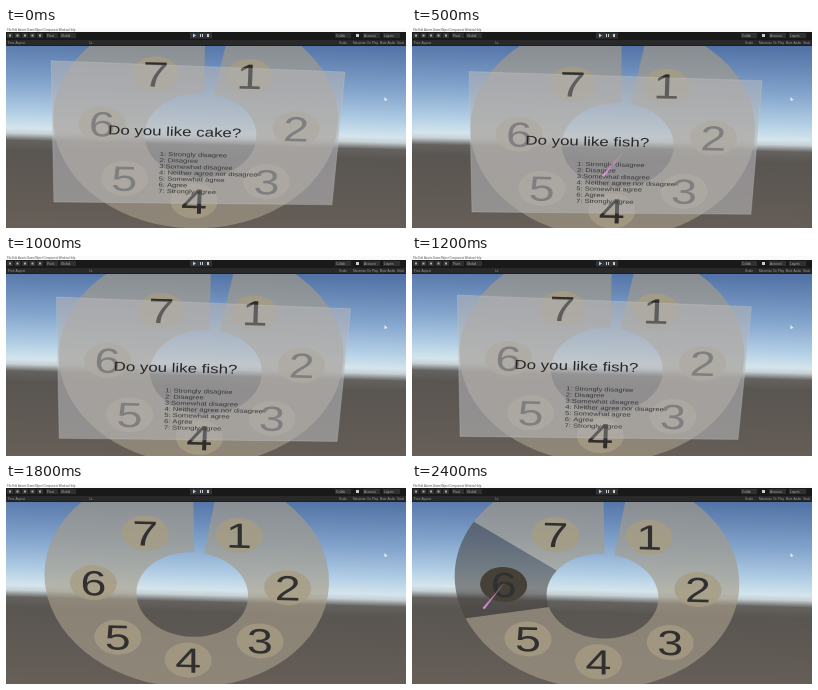
Animation, 400 px wide and 200 px high, one loop 2.5 s. Source, as an HTML page with a canvas:

```html
<!DOCTYPE html>
<html lang="en">
<head>
<meta charset="utf-8">
<style>
html, body { margin: 0; width: 100%; height: 100%; overflow: hidden; background: #222; }
canvas { display: block; width: 400px; height: 200px; }
</style>
</head>
<body>
<canvas id="stage" width="400" height="200"></canvas>
<script>
const c = document.getElementById('stage').getContext('2d');
const LOOP = 2500, STEP = 100, WIDE = 1.33, TAU = Math.PI * 2, SLICE = TAU / 7;
const INNER = .585, OUTER = 1.47;
const FONT = '"Liberation Sans", Arial, sans-serif';

// time, view offset x, y
const path = [[0, 7.5, -3], [300, 23, 8], [700, 14.5, 5.5], [1000, 13, 5.5],
  [1500, -1.5, 0], [2100, 0, 0], [2400, 3.5, 1.7]];
const answers = ['1: Strongly disagree', '2: Disagree', '3:Somewhat disagree',
  '4: Neither agree nor disagree', '5: Somewhat agree', '6: Agree', '7: Strongly agree'];
const PINK = '230,140,222', WHITE = '245,240,238';
const beams = [
  { from: 200, to: 900, x: -14, y: 32, rgb: PINK },
  { from: 1300, to: 1800, x: -37, y: 35, rgb: WHITE },
  { from: 1900, to: 2300, x: 26, y: 48, rgb: WHITE },
  { from: 2300, to: LOOP, x: -119, y: 16, rgb: PINK }
];

function viewAt(t) {
  const i = path.findIndex(p => p[0] > t);
  if (i < 0) return path[path.length - 1];
  const a = path[i - 1], b = path[i], u = (t - a[0]) / (b[0] - a[0]);
  const k = u * u * (3 - 2 * u);
  return a.map((v, j) => v + (b[j] - v) * k);
}

function rect(x, y, w, h, fill) {
  c.fillStyle = fill;
  c.fillRect(x, y, w, h);
}

function polygon(points, fill) {
  c.beginPath();
  for (const p of points) c.lineTo(...p);
  c.closePath();
  c.fillStyle = fill;
  c.fill();
}

function text(s, x, y, size, fill, wide = 1, align = 'left') {
  c.save();
  c.translate(x, y);
  c.scale(wide, 1);
  c.font = size + 'px ' + FONT;
  c.textAlign = align;
  c.fillStyle = fill;
  c.fillText(s, 0, 0);
  c.restore();
}

function sky(horizon, tilt) {
  const g = c.createLinearGradient(0, -100, 0, 90);
  const stops = [[-100, '#5273a6'], [-55, '#83a4cc'], [-25, '#b2cee5'], [-9, '#d4e5ec'],
    [-4, '#c6d0d5'], [3, '#64625f'], [14, '#595551'], [90, '#675f58']];
  for (const [y, col] of stops) g.addColorStop((y + 100) / 190, col);
  c.save();
  c.transform(1, tilt, 0, 1, 200, horizon);
  rect(-210, -130, 420, 240, g);
  c.restore();
}

// perspective point on the wheel, angle clockwise from the top
function project(angle, rx, ry = rx) {
  const y = -Math.cos(angle) * ry, w = 1 + .12 * y;
  const shift = -5.5 * (ry - INNER) / (OUTER - INNER);
  return [95.3 * Math.sin(angle) * rx / w + shift, 3.5 + 72 * y / w];
}

// the gap lies between the last slice and the first
function edge(i) {
  return i === 0 ? .2 : i === 7 ? TAU + .035 : i * SLICE;
}

function segment(first, last, fill) {
  const from = edge(first), span = edge(last) - from, n = 60, points = [];
  for (let i = 0; i <= n; i++) points.push(project(from + span * i / n, OUTER));
  for (let i = n; i >= 0; i--) points.push(project(from + span * i / n, INNER));
  polygon(points, fill);
}

function labelAt(i) {
  const [x, y] = project((i + .5) * SLICE, 1.02, .92);
  return [x - .03 * y, y + 3];
}

function digit(i, fill) {
  const [x, y] = labelAt(i);
  text(i + 1, x, y + 12.5, 35, fill, WIDE, 'center');
}

function wheel(t, active) {
  const body = 'rgba(165,155,137,.65)';
  if (active) {
    segment(0, active - 1, body);
    segment(active - 1, active, 'rgba(72,68,64,.58)');
    segment(active, 7, body);
  } else segment(0, 7, body);

  for (let i = 0; i < 7; i++) {
    c.beginPath();
    c.ellipse(...labelAt(i), 23.5, 17.5, 0, 0, TAU);
    c.fillStyle = i + 1 === active ? '#454139' : 'rgba(167,157,130,.8)';
    c.fill();
    digit(i, '#303030');
  }

  if (active === 3) {
    const [x, y] = labelAt(2);
    c.beginPath();
    c.ellipse(x, y, 23, 18, 0, -TAU / 4, -TAU / 4 + (t - 1900) / 200 * .8);
    c.strokeStyle = '#15133a';
    c.lineWidth = 4;
    c.stroke();
  }
}

function panel(tilt) {
  const corner = (sx, sy) => [
    sx * (143 - sy * (1.5 + 100 * tilt)) - 1 - 160 * tilt,
    sy * (68.5 - sx * 80 * tilt)
  ];
  polygon([corner(-1, -1), corner(1, -1), corner(1, 1), corner(-1, 1)], 'rgba(180,180,183,.6)');
  c.strokeStyle = 'rgba(205,208,210,.35)';
  c.lineWidth = .7;
  c.stroke();
}

function question(topic) {
  // the nearest digits show through more strongly
  for (const i of [0, 3, 6]) digit(i, 'rgba(45,42,40,.4)');
  text(`Do you like ${topic}?`, -92.5, 1.5, 12.7, '#262626', WIDE);
  answers.forEach((s, i) => text(s, -40, 21.8 + i * 6.15, 5.7, '#383838', WIDE));
}

function beam({ x, y, rgb }) {
  const tip = [x + 23, y - 29], g = c.createLinearGradient(x, y, ...tip);
  g.addColorStop(0, `rgba(${rgb},.95)`);
  g.addColorStop(1, `rgba(${rgb},.35)`);
  polygon([[x - 1, y - .6], [x + 1, y + .6], tip], g);
}

function button(label, x, w) {
  rect(x, 5, w, 5, '#303030');
  text(label, x + 1, 8.5, 3.2, '#aaa');
}

function toolbar() {
  rect(0, 0, 400, 4, '#fafafa');
  text('File Edit Assets GameObject Component Window Help', 1, 3, 2.8, '#555');
  rect(0, 4, 400, 8, '#191919');
  for (let x = 1; x < 35; x += 7.5) {
    rect(x, 5, 6, 5, '#333');
    rect(x + 2, 6.5, 2, 2, '#aaa');
  }
  button('Pivot', 40, 12);
  button('Global', 54, 16);
  rect(184, 4.5, 22, 6, '#303438');
  polygon([[187, 5.5], [190, 7.5], [187, 9.5]], '#a9cdea');
  for (const x of [194, 196, 201, 202]) rect(x, 6, 1, 3, '#ccc');
  button('Collab', 329, 16);
  rect(350, 6, 3, 3, '#ccc');
  button('Account', 357, 17);
  button('Layers', 377, 17);
  rect(0, 12, 400, 6, '#292929');
  rect(0, 17, 400, 1, '#1e1e1e');
  text('Free Aspect', 2, 16, 3.2, '#999');
  text('1x', 83, 16, 3.2, '#999');
  text('Scale', 333, 16, 3.2, '#999');
  text('Maximize On Play  Mute Audio  Stats', 347, 16, 3.1, '#999');
}

function draw(t) {
  const [, x, y] = viewAt(t);
  const asking = t < 1800;
  const active = t >= 2300 ? 6 : t >= 1900 ? 3 : 0;
  // the head straightens briefly around 300 ms
  const tilt = .026 - .023 * Math.exp(-(((t - 300) / 170) ** 2));

  sky(115 + .35 * y, tilt);
  c.save();
  c.transform(1, tilt, asking ? -1.5 * tilt : 0, 1, 187 + x, 110 + y);
  wheel(t, active);
  if (asking) {
    panel(tilt);
    question(t < 200 ? 'cake' : 'fish');
  }
  beams.filter(b => t >= b.from && t < b.to).forEach(beam);
  c.restore();
  toolbar();
  polygon([[378.5, 69], [378.5, 73], [381.5, 72]], '#eee');
}

const began = performance.now();
function tick() {
  const t = (performance.now() - began) % LOOP;
  draw(Math.floor(t / STEP) * STEP);
  requestAnimationFrame(tick);
}
tick();
</script>
</body>
</html>
```
